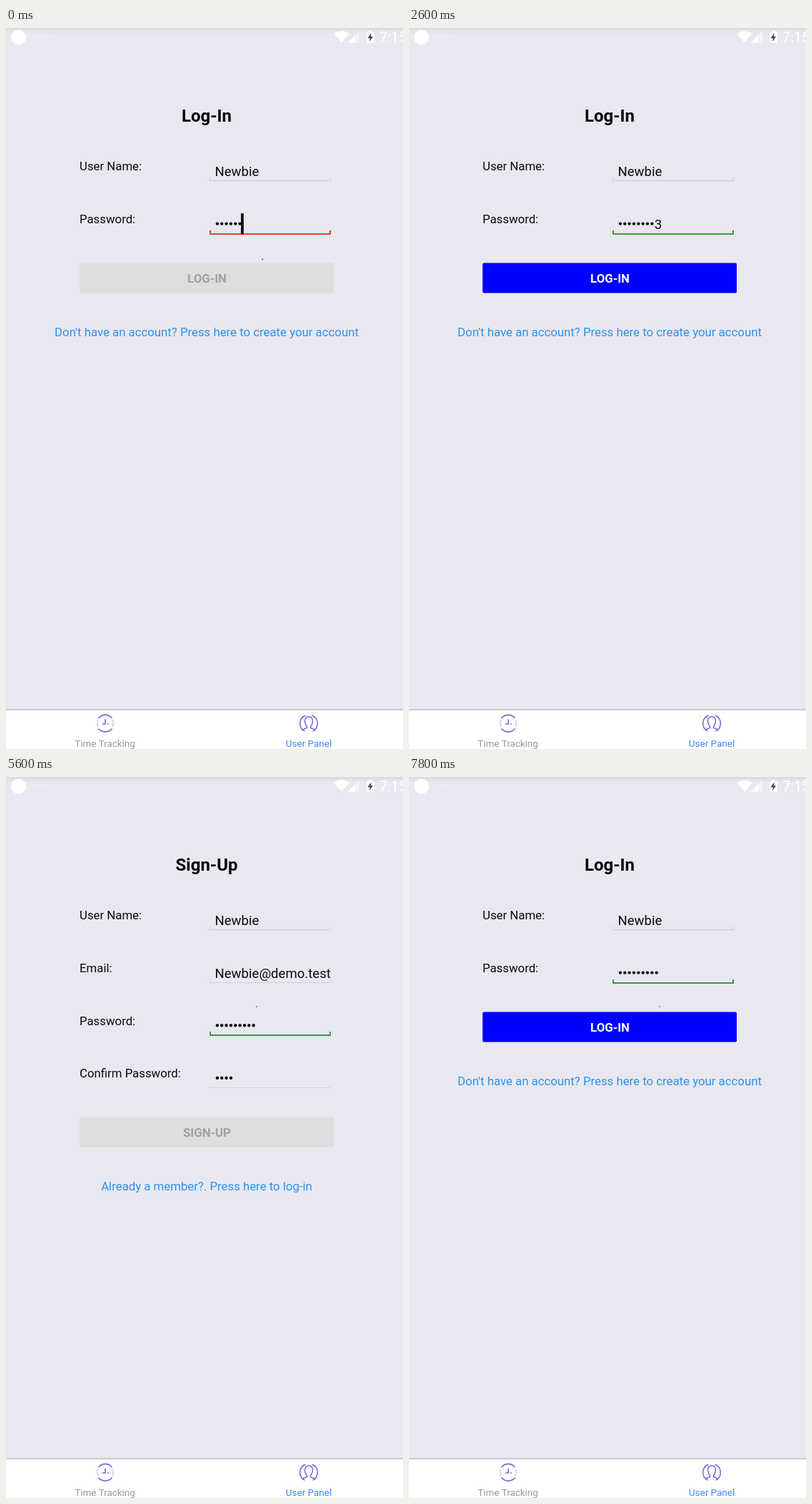
An HTML page with a canvas that plays this animation: 556 px wide and 1008 px high, repeating every 8 s.

```html
<!DOCTYPE html>
<html lang="en">
<head>
<meta charset="utf-8">
<title>Account forms</title>
<style>
  html, body { margin: 0; width: 556px; height: 1008px; overflow: hidden; background: #e9e8f0; }
  canvas { display: block; }
</style>
</head>
<body>
<canvas id="stage" width="556" height="1008"></canvas>
<script>
const ctx = document.getElementById('stage').getContext('2d');
const LOOP = 8000, ROW = 73.6, DOT_PITCH = 6.35, FIELD_X = 293;
const BG = '#e9e8f0', GREEN = '#3b9a42', RED = '#f03b3b', LINK = '#2b92f3', ICON = '#7467dc';
const USER = 'Newbie', EMAIL = 'Newbie@demo.test';

function text(str, x, y, size, color = '#0c0c0e', weight = 400, align = 'left') {
  ctx.font = `${weight} ${size}px Roboto, sans-serif`;
  ctx.fillStyle = color;
  ctx.textAlign = align;
  ctx.fillText(str, x, y);
}

function rect(x, y, w, h, color) {
  ctx.fillStyle = color;
  ctx.fillRect(x, y, w, h);
}

function disc(x, y, r, color) {
  ctx.fillStyle = color;
  ctx.beginPath();
  ctx.arc(x, y, r, 0, Math.PI * 2);
  ctx.fill();
}

function shape(d, color) {
  ctx.fillStyle = color;
  ctx.fill(new Path2D(d));
}

function stroke(d, color, width) {
  ctx.strokeStyle = color;
  ctx.lineWidth = width;
  ctx.stroke(new Path2D(d));
}

function label(row, str) {
  text(str, 103, 199.3 + row * ROW, 16.8);
}

function underline(row, color, focused) {
  const y = Math.round(213 + row * ROW);
  const w = focused ? 2 : 1;
  rect(285, y, 170, w, color);
  rect(285, y - 4, w, 4, color);
  rect(455 - w, y - 4, w, 4, color);
}

function password(row, { dots, last = '', cursor = false }) {
  const y = row * ROW;
  for (let i = 0; i < dots; i++) disc(FIELD_X + 2.9 + i * DOT_PITCH, 200 + y, 2.2, '#0c0c0e');
  let end = FIELD_X + dots * DOT_PITCH;
  if (last) {
    text(last, end, 207.2 + y, 18.6);
    end += ctx.measureText(last).width;
  }
  if (cursor) rect(end - 2, 185.5 + y, 3.7, 29, '#000');
}

function button(y, str, enabled) {
  ctx.fillStyle = enabled ? '#0000ff' : '#dedede';
  ctx.beginPath();
  ctx.roundRect(103, y, 356, 42, 2);
  ctx.fill();
  text(str, 281.5, y + 27.5, 16.8, enabled ? '#fff' : '#a1a1a3', 600, 'center');
}

function statusBar() {
  const shade = ctx.createLinearGradient(0, 0, 0, 10);
  shade.addColorStop(0, '#d6d6dc');
  shade.addColorStop(0.3, '#e2e2e8');
  shade.addColorStop(1, BG);
  rect(0, 0, 556, 10, shade);
  disc(17.5, 13, 10.5, '#fff');
  rect(33, 12, 30, 1.5, 'rgba(255,255,255,.25)');
  shape('M459 7.5Q470 .5 481 7.5L470 20.5Z', '#fff');
  shape('M495 4V20.5H479Z', 'rgba(255,255,255,.45)');
  shape('M489 10.2V20.5H479Z', '#fff');
  shape('M505 6h3v-2h5v2h3v15h-11Z', '#fff');
  shape('M511.5 7l-5 7.2h3.2l-.7 4.8 5-7h-3.2Z', '#44444a');
  text('7:15', 523, 20, 20, '#fff');
}

function tabBar() {
  rect(0, 953, 556, 55, '#fff');
  rect(0, 952.5, 556, 1.3, '#b7b7bc');
  ctx.lineCap = 'round';
  stroke('M130 964.5A12 12 0 0 1 148 964.5M130 980A12 12 0 0 0 148 980', ICON, 1.7);
  stroke('M129 967.5Q126.5 972 129 977M149 967.5Q151.5 972 149 977', '#c5bff2', 1.2);
  stroke('M139 967V973H135.5M142.5 973h.8', ICON, 1.6);
  stroke('M419 961.2A12 12 0 0 0 418 982.8M429 961.2A12 12 0 0 1 430 982.8', ICON, 1.5);
  stroke('M415.5 982Q417 979.5 421.5 978.5V976.5C417 971 417.5 963 424 963S431 971 426.5 976.5V978.5Q431 979.5 432.5 982', ICON, 1.5);
  ctx.lineCap = 'butt';
  text('Time Tracking', 138.5, 1005, 13.4, '#98989c', 400, 'center');
  text('User Panel', 424, 1005, 13.5, '#4089f5', 400, 'center');
}

function form(title, link, linkY) {
  text(title, 281, 131.3, 24, '#050506', 700, 'center');
  label(0, 'User Name:');
  text(USER, FIELD_X - 0.5, 207.2, 18.6);
  underline(0, '#cbcad0');
  text(link, 281, linkY, 16.8, LINK, 400, 'center');
}

function loginEntry(t) {
  if (t < 1500) return { dots: 6, cursor: t < 300 || (t >= 800 && t < 1200) };
  if (t < 1700) return { dots: 6, last: '1', cursor: true };
  if (t < 1800) return { dots: 7, last: '2', cursor: true };
  if (t < 3300) return { dots: 8, last: '3', cursor: t < 2300 || t >= 2800 };
  return { dots: 9 };
}

function drawLogin(t) {
  const valid = t >= 1500;
  form('Log-In', "Don't have an account? Press here to create your account", 430.6);
  label(1, 'Password:');
  underline(1, valid ? GREEN : RED, true);
  password(1, loginEntry(t));
  button(328.4, 'LOG-IN', valid);
}

function drawSignup(t) {
  const blinks = [4600, 5100, 5600, 6000, 6500, 7100].filter(b => t >= b).length;
  form('Sign-Up', 'Already a member?. Press here to log-in', 577.8);
  label(1, 'Email:');
  underline(1, '#d2d1d7');
  text(EMAIL, FIELD_X - 0.5, 207.2 + ROW, 18.6);
  label(2, 'Password:');
  underline(2, GREEN, true);
  password(2, { dots: 9, cursor: blinks % 2 === 0 });
  label(3, 'Confirm Password:');
  underline(3, '#ebc9ce');
  password(3, { dots: 4 });
  button(475.6, 'SIGN-UP', false);
}

function draw() {
  const t = performance.now() % LOOP;
  rect(0, 0, 556, 1008, BG);
  statusBar();
  if (t >= 3800 && t < 7300) drawSignup(t);
  else drawLogin(t);
  tabBar();
  // the mouse pointer shows only as a speck, hidden while typing
  if (t < 300) rect(358.5, 322.5, 1.5, 1.5, '#222');
  else if (t >= 3200) rect(350.3, 320.5, 1.3, 1.3, '#333');
  requestAnimationFrame(draw);
}
draw();
</script>
</body>
</html>
```
